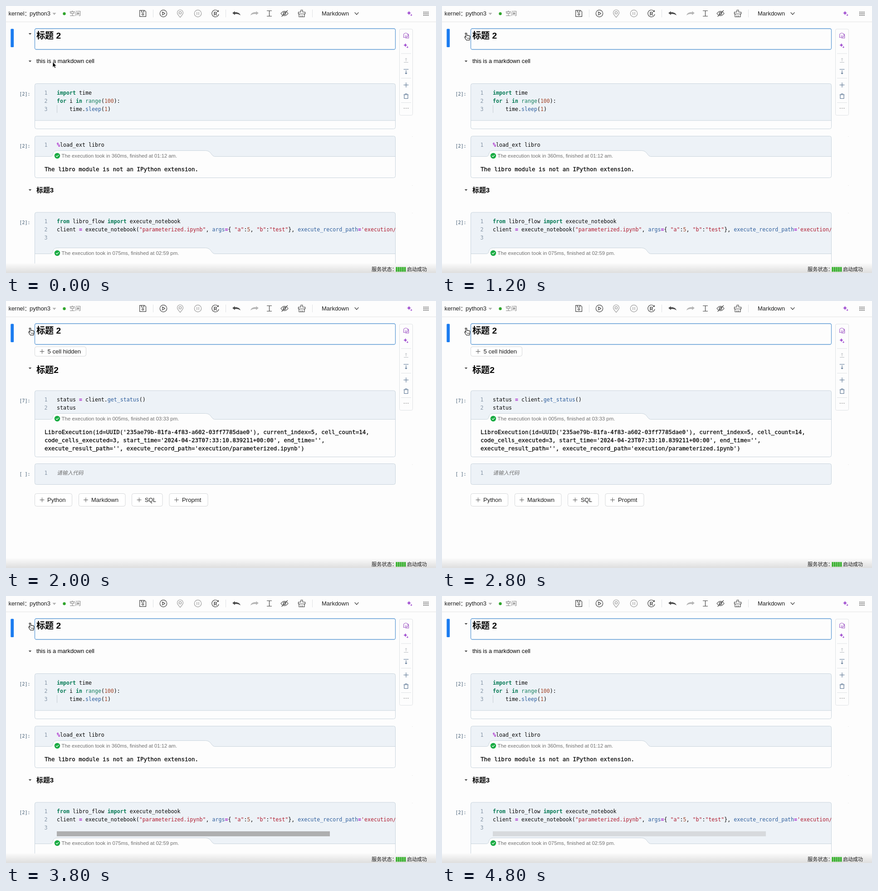
Write an HTML page that moves like this. It is 948 px wide and 590 px high and loops after 5000 ms.

```html
<!DOCTYPE html>
<html lang="zh">
<head>
<meta charset="utf-8">
<title>Notebook</title>
<style>
html, body { margin: 0; width: 100%; height: 100%; overflow: hidden; background: #fdfdfd; }
svg { display: block; width: 948px; height: 590px; }
text { white-space: pre; font: 13px "Liberation Sans", "Noto Sans CJK SC", "Noto Sans CJK", sans-serif; fill: #1c1c1c; }
.code, .out, .num, .tag { font-family: "DejaVu Sans Mono", "Noto Sans CJK SC", monospace; fill: #080808; }
.code, .num { font-size: 11.627px; }
.out { font-size: 12.52px; stroke: #080808; stroke-width: .3; }
.num { fill: #8796a8; }
.tag { font-size: 10px; fill: #3d5870; }
.h2 { font-size: 19.1px; font-weight: bold; fill: #000; }
.h3 { font-size: 14.9px; font-weight: bold; fill: #000; }
.info { font-size: 11.45px; fill: #707070; }
.k { fill: #067a55; font-weight: bold; }
.b { fill: #16805f; }
.n { fill: #a5482c; }
.f { fill: #2b5c9c; }
.s { fill: #b01c30; }
.p { fill: #30609e; }
.o { fill: #a51cc8; font-weight: bold; }
.ln { fill: none; stroke: #444; stroke-width: 1.2; stroke-linecap: round; stroke-linejoin: round; }
.dim { stroke: #9c9c9c; }
.blue { stroke: #55708f; stroke-width: 1.1; }
.violet { stroke: #a35fc8; stroke-width: 1.1; }
.edge { fill: none; stroke: #c9d4dd; }
.sep { stroke: #dfe2e5; }

.open { animation: open 5s step-end infinite; }
.shut { animation: shut 5s step-end infinite; }
.arrow { animation: arrow 5s step-end infinite; }
.hand { animation: hand 5s step-end infinite; }
.bar { animation: bar 5s step-end infinite; }
@keyframes open { 0%, 76% { visibility: visible } 40% { visibility: hidden } }
@keyframes shut { 0%, 76% { visibility: hidden } 40% { visibility: visible } }
@keyframes hand { 0%, 84% { visibility: hidden } 24% { visibility: visible } }
@keyframes arrow {
  0%, 4% { transform: translate(103px, 124px); visibility: visible }
  8% { transform: translate(98px, 115px); visibility: visible }
  12% { transform: translate(87px, 100px); visibility: visible }
  16% { transform: translate(72px, 82px); visibility: visible }
  20% { transform: translate(59px, 69px); visibility: visible }
  24%, 100% { transform: translate(54px, 61px); visibility: hidden }
}
@keyframes bar {
  0% { opacity: 0 }
  76% { opacity: 1 }
  88% { opacity: .875 }
  92% { opacity: .625 }
  96% { opacity: .36 }
}
</style>
</head>
<body>
<svg viewBox="0 0 948 590">
  <defs>
    <linearGradient id="fade" x2="0" y2="1">
      <stop offset="0" stop-color="#fafafa"/><stop offset="1" stop-color="#dedede"/>
    </linearGradient>
    <clipPath id="page"><path d="M0 36H948V570H0z"/></clipPath>
    <clipPath id="editor"><path d="M64 457H858V547H64z"/></clipPath>
    <path id="caret" d="M-3.2 -1.6H3.2L0 2z" fill="#444"/>
    <path id="plus" class="ln" d="M-4.5 0H4.5M0 -4.5V4.5" style="stroke:#555;stroke-width:1"/>
    <path id="spark" d="M0 -5Q.8 -.8 5 0Q.8 .8 0 5Q-.8 .8 -5 0Q-.8 -.8 0 -5z" fill="#a04fd0"/>
    <path id="back" d="M-9 -1.500L-3.500 -6V-3.300C3 -4 8 -1.500 9 4C5.500 .8 1.500 0 -3.500 .7V3.300z"/>
    <!-- divider with the status tab, origin at the left end of the line -->
    <g id="tab">
      <path d="M34 .5C43 0 36 -13 50 -13H376C389 -13 388 -2 396 .5z" fill="#fdfdfd"/>
      <path class="edge" d="M0 0H34C43 0 36 -13 50 -13H376C389 -13 388 -2 396 0H795"/>
      <circle cx="49.5" cy="-1.5" r="6.2" fill="#18ab42"/>
      <path class="ln" d="M46.8 -1.4L48.8 .7L52.3 -3.2" style="stroke:#fff"/>
    </g>
  </defs>

  <rect width="948" height="590" fill="#fdfdfd"/>

  <!-- selected heading -->
  <rect x="10.3" y="50.5" width="6.8" height="40.5" rx="1.5" fill="#1b7cf0"/>
  <rect x="63.5" y="50" width="795" height="46" rx="3.5" fill="#fdfdfd" stroke="#629dd6" stroke-width="1.3"/>
  <use href="#caret" x="53" y="61.5"/>
  <text class="h2" x="67" y="71.8">标题 2</text>

  <g class="open" clip-path="url(#page)">
    <use href="#caret" x="53" y="122"/>
    <text x="67" y="126" style="font-size:12.73px;fill:#000">this is a markdown cell</text>

    <text class="tag" x="29.5" y="197.5">[2]:</text>
    <path d="M63.5 253V175.5a4 4 0 0 1 4-4H854.5a4 4 0 0 1 4 4V253z" fill="#edf2f7"/>
    <rect class="edge" x="63.5" y="171.5" width="795" height="100" rx="4"/>
    <path class="edge" d="M63.5 253H858.5"/>
    <path d="M112.5 219V236" stroke="#c5ccd3"/>
    <text class="num" x="84.5" y="195.5">1</text>
    <text class="num" x="84.5" y="213.5">2</text>
    <text class="num" x="84.5" y="231.5">3</text>
    <text class="code" x="112" y="195.5"><tspan class="k">import</tspan> time</text>
    <text class="code" x="112" y="213.5"><tspan class="k">for</tspan> i <tspan class="k">in</tspan> <tspan class="b">range</tspan>(<tspan class="n">100</tspan>):</text>
    <text class="code" x="140" y="231.5">time.<tspan class="f">sleep</tspan>(<tspan class="n">1</tspan>)</text>

    <text class="tag" x="29.5" y="312.5">[2]:</text>
    <path d="M63.5 332.5V291.5a4 4 0 0 1 4-4H854.5a4 4 0 0 1 4 4V332.5z" fill="#edf2f7"/>
    <rect class="edge" x="63.5" y="287.5" width="795" height="92" rx="4"/>
    <use href="#tab" x="63.5" y="332.5"/>
    <text class="num" x="84.5" y="311">1</text>
    <text class="code" x="112" y="311"><tspan class="o">%</tspan>load_ext libro</text>
    <text class="info" x="122.6" y="335" style="font-size:11.25px">The execution took in 360ms, finished at 01:12 am.</text>
    <text class="out" x="85" y="365">The libro module is not an IPython extension.</text>

    <use href="#caret" x="53" y="406.5"/>
    <text class="h3" x="67" y="412">标题3</text>

    <text class="tag" x="29.5" y="481.5">[2]:</text>
    <path d="M63.5 547.5V460a4 4 0 0 1 4-4H854.5a4 4 0 0 1 4 4V547.5z" fill="#edf2f7"/>
    <rect class="edge" x="63.5" y="456" width="795" height="140" rx="4"/>
    <use href="#tab" x="63.5" y="547.5"/>
    <text class="num" x="84.5" y="479.5">1</text>
    <text class="num" x="84.5" y="497.5">2</text>
    <text class="num" x="84.5" y="515.5">3</text>
    <text class="code" x="112" y="479.5"><tspan class="k">from</tspan> libro_flow <tspan class="k">import</tspan> execute_notebook</text>
    <g clip-path="url(#editor)">
      <text class="code" x="112" y="497.5">client <tspan class="o">=</tspan> execute_notebook(<tspan class="s">"parameterized.ipynb"</tspan>, <tspan class="p">args</tspan><tspan class="o">=</tspan>{ <tspan class="s">"a"</tspan>:<tspan class="n">5</tspan>, <tspan class="s">"b"</tspan>:<tspan class="s">"test"</tspan>}, <tspan class="p">execute_record_path</tspan><tspan class="o">=</tspan><tspan class="s">'execution/parameterized</tspan></text>
    </g>
    <rect class="bar" x="112" y="520" width="602" height="11" fill="#aeafb0"/>
    <text class="info" x="122.6" y="550">The execution took in 075ms, finished at 02:59 pm.</text>
    <path d="M896 288v1M896 396v1M896 457v1" stroke="#ddd"/>
  </g>

  <g class="shut">
    <rect x="63.5" y="101" width="113" height="21" rx="4" fill="#fff" stroke="#d6d8da"/>
    <use href="#plus" x="79.5" y="111.5"/>
    <text x="91.5" y="116" style="font-size:13.1px">5 cell hidden</text>

    <use href="#caret" x="53" y="148.5"/>
    <text class="h2" x="67" y="158.7">标题2</text>

    <text class="tag" x="29.5" y="223.5">[7]:</text>
    <path d="M63.5 261.5V202a4 4 0 0 1 4-4H854.5a4 4 0 0 1 4 4V261.5z" fill="#edf2f7"/>
    <rect class="edge" x="63.5" y="198" width="795" height="146.5" rx="4"/>
    <use href="#tab" x="63.5" y="261.5"/>
    <text class="num" x="84.5" y="222">1</text>
    <text class="num" x="84.5" y="240">2</text>
    <text class="code" x="112" y="222">status <tspan class="o">=</tspan> client.<tspan class="f">get_status</tspan>()</text>
    <text class="code" x="112" y="240">status</text>
    <text class="info" x="122.6" y="264">The execution took in 005ms, finished at 03:33 pm.</text>
    <text class="out" x="85" y="294">LibroExecution(id=UUID('235ae79b-81fa-4f83-a602-03ff7785dae0'), current_index=5, cell_count=14,</text>
    <text class="out" x="85" y="312">code_cells_executed=3, start_time='2024-04-23T07:33:10.839211+00:00', end_time='',</text>
    <text class="out" x="85" y="330">execute_result_path='', execute_record_path='execution/parameterized.ipynb')</text>

    <text class="tag" x="29.5" y="385.5">[ ]:</text>
    <rect x="63.5" y="359.5" width="795" height="46" rx="4" fill="#edf2f7" stroke="#c9d4dd"/>
    <text class="num" x="84.5" y="384">1</text>
    <text x="112" y="384" style="font-size:11.7px;font-style:italic;fill:#707070">请输入代码</text>

    <g fill="#fff" stroke="#d6d8da">
      <rect x="63.5" y="425.5" width="82" height="28" rx="4"/>
      <rect x="160.5" y="425.5" width="102.5" height="28" rx="4"/>
      <rect x="277.5" y="425.5" width="67.5" height="28" rx="4"/>
      <rect x="360" y="425.5" width="85" height="28" rx="4"/>
    </g>
    <use href="#plus" x="79.5" y="439.5"/><text x="91" y="444">Python</text>
    <use href="#plus" x="176" y="439.5"/><text x="188" y="444">Markdown</text>
    <use href="#plus" x="293.5" y="439.5"/><text x="306" y="444" style="font-size:12.5px">SQL</text>
    <use href="#plus" x="376" y="439.5"/><text x="388" y="444" style="font-size:13.2px">Propmt</text>
    <path d="M896 361v1" stroke="#ddd"/>
  </g>

  <!-- cell tools -->
  <rect class="sep" x="867.5" y="51" width="29" height="190.5" rx="3" fill="#fdfdfd"/>
  <path class="sep" d="M871 105H893M871 159.5H893M871 213.5H893"/>
  <path class="ln violet" d="M876.5 69.5V64.7a4.900 4.900 0 1 1 4.900 4.800zM886.5 62a4.500 4.500 0 0 1 1.200 3.500V71H883.5Q881.5 71 880.5 70"/>
  <path class="ln violet" d="M879.5 66Q881.5 67.800 883.5 66"/>
  <use href="#spark" transform="translate(880.5 86.5) scale(.9)"/>
  <use href="#spark" transform="translate(885 91) scale(.5)"/>
  <path class="ln" d="M877.5 124.5H886.5M882 122V115.5M880.3 117.3L882 115.5L883.7 117.3" style="stroke:#b9bdc2;stroke-width:1"/>
  <path class="ln blue" d="M877 140H887M882 142.5V150M880.2 148.2L882 150L883.8 148.2"/>
  <path class="ln blue" d="M877 174.5H887M882 169.5V179.5"/>
  <path class="ln blue" d="M877 196H887M880 196V194H884V196M878 196V204.5H886V196"/>
  <path d="M877 226h1.500M881.3 226h1.500M885.6 226h1.500" stroke="#777" stroke-width="1.4"/>

  <!-- top bar -->
  <path d="M0 35H948" stroke="#e2e2e2"/>
  <text x="5.5" y="21" style="font-size:12.9px">kernel：</text>
  <text x="52" y="21" style="font-size:12.93px">python3</text>
  <path d="M102.5 15H110.5L106.5 20z" fill="#b5b5b5"/>
  <circle cx="128.5" cy="17" r="3.2" fill="#2fa52b"/>
  <text x="140" y="21" style="font-size:12.5px;fill:#777">空闲</text>
  <path class="sep" d="M324.5 8V25M484.5 8V25M675.5 8V25"/>
  <path class="ln" d="M294.700 9.700H305.500L308.500 12.700V23.300H294.700zM298.500 9.700V13.500H304V9.700"/>
  <circle class="ln" cx="301.7" cy="18.3" r="1.9"/>
  <circle class="ln" cx="347" cy="16.5" r="7.7"/>
  <path class="ln" d="M345 13V20L350.5 16.5z"/>
  <path class="ln dim" d="M384 25C380 20.500 377.500 18 377.500 15a6.500 6.500 0 0 1 13 0C390.500 18 388 20.500 384 25z"/>
  <circle class="ln dim" cx="384" cy="15" r="2.7"/>
  <circle class="ln dim" cx="423" cy="16.5" r="7.7"/>
  <path class="ln dim" d="M421 13.5V19.5M425 13.5V19.5"/>
  <path class="ln" d="M467.5 11.5A7.700 7.700 0 1 0 469 18.5M468.3 9.5V12.5H465.3"/>
  <text x="457.800" y="20.5" style="font-size:10.5px;font-weight:bold;fill:#444">R</text>
  <use href="#back" transform="translate(508 17) scale(.98 .92)" fill="#484848"/>
  <use href="#back" transform="translate(548 17) scale(-.98 .92)" fill="#b5b5b5"/>
  <path class="ln" d="M575.5 10.5H585.5M575.5 22.5H585.5M580.5 10.5V22.5"/>
  <path class="ln" d="M606 16.5Q614 6.500 622 16.500Q614 26.500 606 16.500zM608 23L620.500 10"/>
  <circle class="ln" cx="614" cy="16.5" r="2.800"/>
  <path class="ln" d="M650 13.500V9H654V13.500H659.500V17.500H644.500V13.500zM646 17.500V24H658V17.500M650.300 24V21M654 24V21"/>
  <text x="696" y="21">Markdown</text>
  <path class="ln" d="M769 14.5L773 19L777 14.5"/>
  <use href="#spark" x="888.5" y="15.5"/>
  <use href="#spark" transform="translate(893.5 20) scale(.5)"/>
  <path d="M920 13.5H932M920 17H932M920 20.5H932" stroke="#555" stroke-width="1.5" stroke-dasharray="2.2 1"/>

  <!-- status bar -->
  <rect y="569" width="948" height="21" fill="url(#fade)"/>
  <text x="806" y="586" style="font-size:11.2px">服务状态：</text>
  <path d="M859.5 582H881.5" stroke="#35b02b" stroke-width="10.5" stroke-dasharray="3.7 .85"/>
  <text x="884" y="586" style="font-size:11px">启动成功</text>

  <!-- pointer -->
  <g class="arrow">
    <path d="M0 0V11.5L2.700 9L4.500 13.200L6.600 12.300L4.800 8.300H8.300z" fill="#000" stroke="#fff" stroke-width=".8"/>
  </g>
  <g class="hand">
    <path d="M53.800 75.500L50.200 70C49 67.800 50.700 67 52 68.300L53 69.300L51.700 61.300C51.500 59 53.700 58.900 54.200 61L55 65.300C55.500 64 57 64.200 57.300 65.500C58 64.500 59.400 65 59.600 66.200C60.500 65.500 61.700 66.200 61.800 67.400C62.100 70.500 61.500 72.500 60.600 75.500z" fill="#fff" stroke="#111" stroke-width="1.1" stroke-linejoin="round"/>
    <path d="M56 70V73M58 70V73M59.800 70V73" stroke="#111" stroke-width=".7"/>
  </g>
</svg>
</body>
</html>
```
